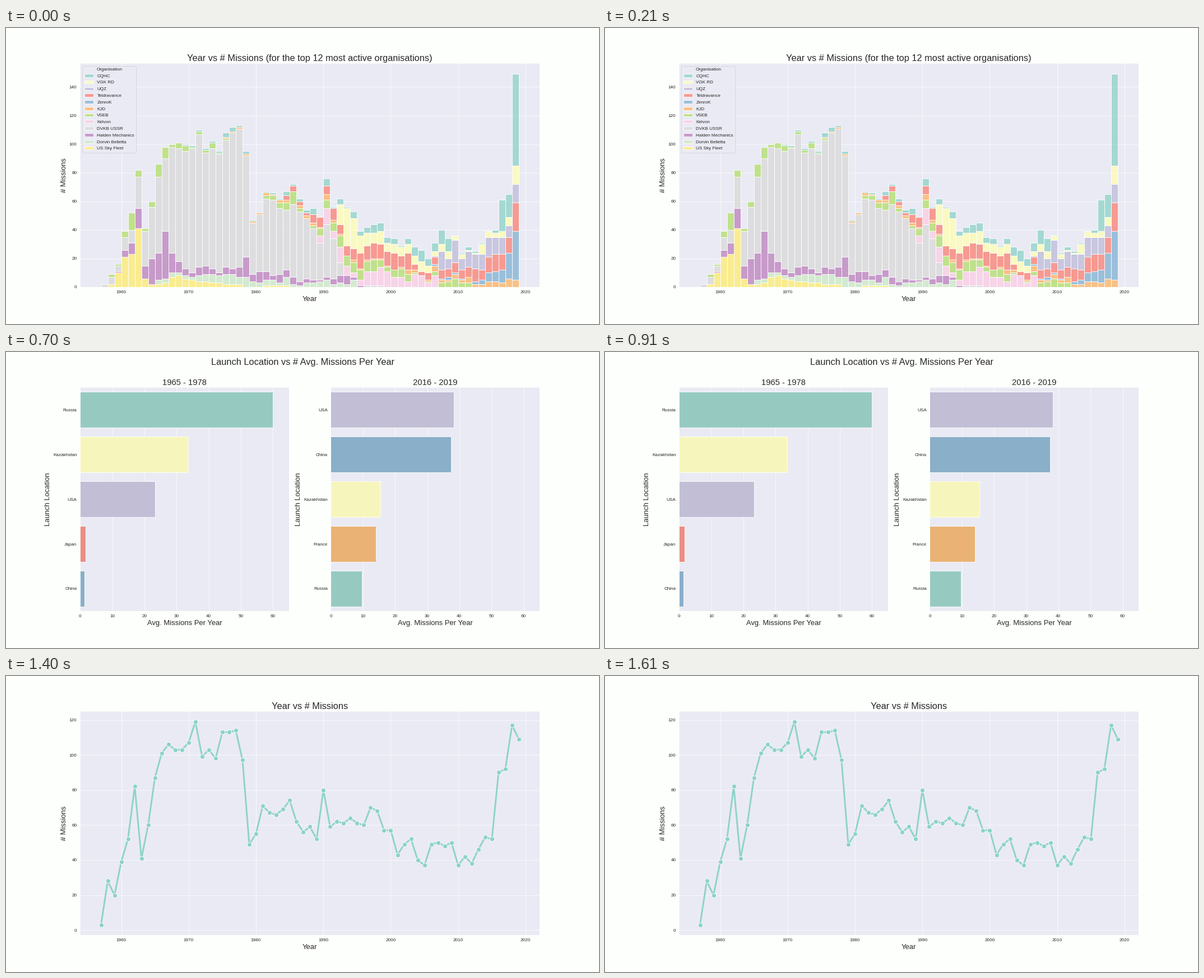
A matplotlib script that plays this animation: 1058 by 529 pixels, repeating every 1.75 s.

```python
import colorsys

import matplotlib.pyplot as plt
import numpy as np
from matplotlib.animation import FuncAnimation
from matplotlib.colors import to_rgb, to_rgba
from matplotlib.lines import Line2D
from matplotlib.patches import Patch
from matplotlib.ticker import MultipleLocator

INK = "0.15"
PANEL = "#eaeaf4"
PALETTE = ["#8dd3c7", "#ffffb3", "#bebada", "#fb8072", "#80b1d3", "#fdb462",
           "#b3de69", "#fccde5", "#d9d9d9", "#bc80bd", "#ccebc5", "#ffed6f"]
TEAL, CREAM, LILAC, RED, BLUE, ORANGE, GREEN, PINK, GREY, PURPLE = PALETTE[:10]
FIRST, LAST = 1957, 2019
YEARS = np.arange(FIRST, LAST + 1)

plt.rcParams.update({
    "font.family": "Liberation Sans", "font.size": 10, "text.color": INK,
    "figure.facecolor": "#fdfffc", "savefig.facecolor": "#fdfffc",
    "axes.facecolor": PANEL, "axes.edgecolor": "white", "axes.labelcolor": INK,
    "axes.labelsize": 16, "axes.axisbelow": True, "axes.grid": True,
    "grid.color": "white", "grid.linestyle": "-", "grid.linewidth": 0.8,
    "xtick.color": INK, "ytick.color": INK,
    "xtick.bottom": False, "ytick.left": False,
    "patch.edgecolor": "white", "lines.solid_capstyle": "round",
    "figure.subplot.left": 0.125, "figure.subplot.right": 0.9,
    "figure.subplot.bottom": 0.125, "figure.subplot.top": 0.88,
})

# Missions per year of each organisation, from its first active year on.
orgs = {}


def add_org(name, start, counts):
    row = np.zeros(len(YEARS), int)
    row[start - FIRST:start - FIRST + len(counts)] = counts
    orgs[name] = row


add_org("CQHC", 1969, [
    1, 1, 1, 1, 1, 1, 3, 3, 1, 2, 1, 0, 1, 1, 1, 3, 1, 2, 2, 4, 0, 5, 1, 4, 1, 5,
    3, 4, 6, 6, 4, 4, 1, 4, 6, 8, 5, 6, 10, 9, 0, 1, 2, 1, 1, 0, 2, 22, 16, 37, 27])
add_org("VGK RD", 1992, [
    14, 26, 21, 12, 9, 7, 9, 6, 6, 6, 6, 6, 7, 5, 3, 5, 5, 3, 3, 1, 1, 7, 4, 3,
    4, 6, 5, 8])
add_org("UQZ", 2006, [1, 13, 7, 16, 8, 11, 10, 11, 14, 12, 12, 8, 8, 5])
add_org("Teldravance", 1984, [
    3, 4, 3, 2, 6, 7, 6, 8, 7, 7, 8, 11, 10, 11, 10, 10, 12, 8, 12, 4, 3, 5, 5,
    6, 6, 7, 6, 7, 9, 7, 11, 12, 11, 11, 11, 9])
add_org("ZenroK", 2006, [1, 1, 2, 1, 1, 0, 2, 3, 6, 7, 9, 18, 21, 13])
add_org("KJD", 1975, [
    1, 1, 1, 1, 1, 1, 2, 1, 2, 2, 0, 2, 2, 2, 1, 4, 2, 1, 0, 2, 1, 1, 1, 1, 1, 0,
    1, 3, 2, 0, 1, 4, 2, 1, 3, 2, 4, 2, 2, 4, 4, 3, 6, 4, 1])
add_org("VSEB", 1958, [
    2, 1, 4, 12, 5, 2, 4, 9, 8, 2, 4, 4, 1, 2, 2, 4, 1, 1, 0, 0, 0, 0, 0, 2, 3, 4,
    5, 9, 2, 0, 2, 5, 6, 6, 8, 7, 7, 7, 7, 8, 5, 3, 5, 6, 5, 1, 0, 1, 3, 3, 4, 6,
    3, 3])
add_org("Kelvon", 1989, [
    5, 11, 5, 11, 7, 3, 4, 10, 10, 13, 11, 7, 7, 4, 9, 8, 3, 8])
add_org("DVKB USSR", 1957, [
    2, 5, 4, 9, 9, 22, 24, 36, 53, 51, 74, 79, 82, 87, 93, 79, 84, 83, 89, 95, 97,
    71, 36, 40, 51, 53, 46, 42, 51, 49, 42, 36, 26, 37, 28, 9, 0, 0, 0, 1, 1, 1])
add_org("Halden Mechanics", 1959, [
    1, 5, 8, 14, 9, 18, 19, 33, 14, 8, 5, 3, 6, 6, 4, 2, 5, 4, 7, 14, 5, 8, 6, 3,
    6, 5, 5, 3, 3, 2, 1, 2, 4, 5, 6, 2, 1])
add_org("Dorvin Belletta", 1965, [
    3, 3, 3, 2, 2, 2, 4, 5, 6, 5, 7, 7, 5, 7, 4, 3, 4, 4, 2, 6, 2, 1, 3, 3, 4, 5,
    2, 3, 2, 5])
add_org("US Sky Fleet", 1958, [
    2, 10, 21, 23, 41, 6, 2, 2, 3, 7, 8, 6, 5, 4, 4, 3, 3, 2, 2, 2, 0, 0, 0, 1, 1,
    1, 1])

LINE_ORDER = ["Teldravance", "Kelvon", "CQHC", "Halden Mechanics", "KJD",
              "Dorvin Belletta", "VSEB", "DVKB USSR", "ZenroK", "UQZ",
              "US Sky Fleet", "VGK RD"]

ALL_MISSIONS = [
    3, 28, 20, 39, 52, 82, 41, 60, 87, 101, 106, 103, 103, 107, 119, 99, 103, 98,
    113, 113, 114, 97, 49, 55, 71, 67, 66, 69, 74, 62, 56, 59, 52, 80, 59, 62, 61,
    64, 61, 60, 70, 68, 57, 57, 43, 49, 52, 40, 37, 49, 50, 48, 50, 37, 42, 38, 46,
    53, 52, 90, 92, 117, 109]

TOP_TITLE = "Year vs # Missions (for the top 12 most active organisations)"

# 18 x 9 inches, a hair over 58.7777 dpi: 1058 x 529 pixels
fig = plt.figure(figsize=(18, 9), dpi=58.7778)


def year_axes(title, low, high):
    ax = fig.add_subplot()
    ax.set_title(title, size=20)
    ax.set_xlabel("Year")
    ax.set_ylabel("# Missions")
    ax.set_xlim(FIRST - 3.1, LAST + 3.1)
    ax.set_ylim(low, high)
    ax.xaxis.set_major_locator(MultipleLocator(10))
    ax.yaxis.set_major_locator(MultipleLocator(20))
    return ax


def add_legend(ax, handles, loc):
    ax.legend(handles=handles, loc=loc, title="Organisation",
              facecolor=PANEL, edgecolor="0.8", framealpha=0.8)


def draw_stack():
    ax = year_axes(TOP_TITLE, 0, 156.45)
    base = np.zeros(len(YEARS) - 1)
    handles = []
    for (name, row), color in reversed(list(zip(orgs.items(), PALETTE))):
        bins = row[:-1].copy()
        bins[-1] += row[-1]  # the last bin holds both final years
        face = to_rgba(color, 0.75)
        used = bins > 0
        ax.bar(YEARS[:-1][used], bins[used], 1, base[used], align="edge",
               facecolor=face, edgecolor="white", linewidth=1)
        base += bins
        handles.insert(0, Patch(facecolor=face, edgecolor="white", label=name))
    ax.set_ylim(0, 156.45)
    add_legend(ax, handles, "upper left")


def draw_lines():
    ax = year_axes(TOP_TITLE, -3.8, 101.8)
    handles = []
    for name, color in zip(LINE_ORDER, PALETTE):
        row = orgs[name]
        used = row > 0
        ax.plot(YEARS[used], row[used], "o-", color=color, lw=3.5, ms=7,
                mec="white", mew=1)
        handles.append(Line2D([], [], color=color, lw=2, label=name))
    add_legend(ax, handles, "upper right")


def draw_total():
    ax = year_axes("Year vs # Missions", -2.8, 124.8)
    ax.plot(YEARS, ALL_MISSIONS, "o-", color=TEAL, lw=3.5, ms=10,
            mec="white", mew=1)


def soften(color):
    h, l, s = colorsys.rgb_to_hls(*to_rgb(color))
    return colorsys.hls_to_rgb(h, l, 0.75 * s)


def bar_panel(spot, period, ylabel, bars, top, step):
    names, values, colors = zip(*bars)
    ax = fig.add_subplot(1, 2, spot)
    rows = range(len(names))
    ax.barh(rows, values, 0.8, color=[soften(c) for c in colors],
            edgecolor="white", linewidth=1)
    ax.set_title(period, size=18)
    ax.set_xlabel("Avg. Missions Per Year")
    ax.set_ylabel(ylabel)
    ax.set_yticks(rows, names)
    ax.set_xlim(0, top)
    ax.set_ylim(len(names) - 0.5, -0.5)
    ax.xaxis.set_major_locator(MultipleLocator(step))
    ax.grid(False, axis="y")


def bar_pair(title, ylabel, left, right, top, step):
    fig.suptitle(title, size=20)
    bar_panel(1, "1965 - 1978", ylabel, left, top, step)
    bar_panel(2, "2016 - 2019", ylabel, right, top, step)


def draw_places():
    bar_pair("Launch Location vs # Avg. Missions Per Year", "Launch Location",
             [("Russia", 59.9, TEAL), ("Kazakhstan", 33.7, CREAM),
              ("USA", 23.3, LILAC), ("Japan", 1.75, RED), ("China", 1.33, BLUE)],
             [("USA", 38.2, LILAC), ("China", 37.4, BLUE),
              ("Kazakhstan", 15.5, CREAM), ("France", 14, ORANGE),
              ("Russia", 9.75, TEAL)], 65, 10)


def draw_orgs():
    bar_pair("Orgnaisation vs # Avg. Missions Per Year", "Organisation",
             [("DVKB USSR", 93.2, TEAL), ("Halden Mechanics", 10.9, CREAM),
              ("Dorvin Belletta", 5.1, LILAC), ("US Sky Fleet", 4.2, RED),
              ("VSEB", 3.1, BLUE)],
             [("CQHC", 34.1, ORANGE), ("ZenroK", 20.5, GREEN),
              ("Nebesprom", 14.4, PINK), ("Teldravance", 14.1, GREY),
              ("UQZ", 11.1, PURPLE)], 100, 20)


SCENES = [draw_stack, draw_lines, draw_places, draw_orgs, draw_total]


def update(i):
    fig.clear()
    SCENES[i]()
    return []


anim = FuncAnimation(fig, update, frames=len(SCENES), interval=350,
                     init_func=lambda: [], repeat=True, repeat_delay=0, blit=False)
plt.show()
```
